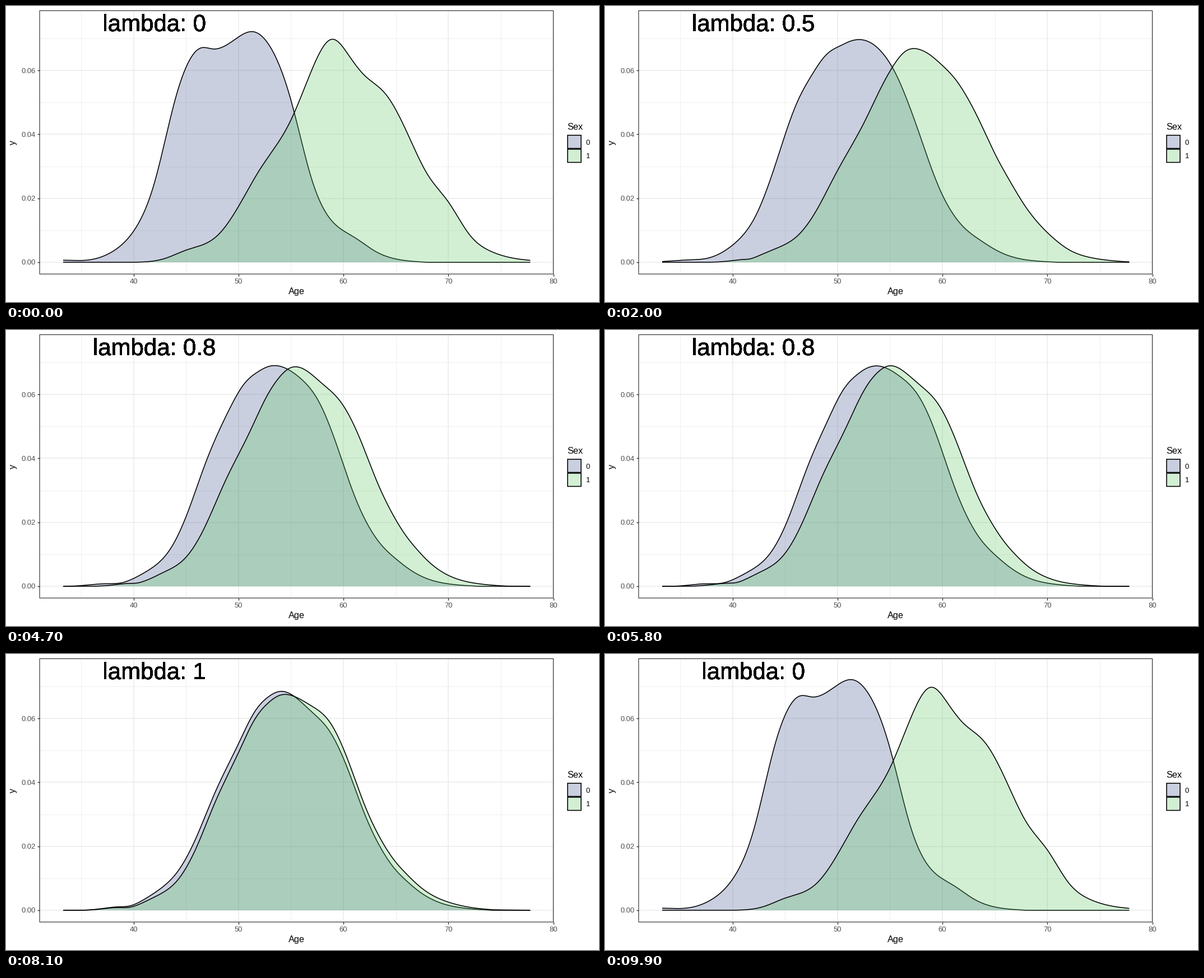
Recreate the animation shown at these times as a matplotlib script. Size 1058 px wide and 529 px high, loop 10 s.

```python
import matplotlib.pyplot as plt
import numpy as np
from matplotlib import patheffects
from matplotlib.animation import FuncAnimation
from matplotlib.patches import Polygon, Rectangle

WIDTH, HEIGHT, DPI = 1058, 529, 64
PT = 72 / DPI  # points per pixel
LEFT, RIGHT, TOP, BOTTOM = 60, 976.5, 8.4, 479
GRID, BORDER, TICK_TEXT = "#ebebeb", "#333333", "#4d4d4d"
FILLS = ("#3b528b", "#5dc863")
ALPHA = 0.275

FINE = np.linspace(30, 81, 2500)
AGES = np.linspace(33.3, 77.8, 512)
LAMBDAS = (0, 0.5, 0.8, 1)

# (age, density in thousandths) where the unrepaired curves bend
KEYS = (
    [(30.5, 0), (33.3, 0.65), (35.5, 0.65), (38, 3.35), (40, 9.7), (42, 24.9),
     (44, 51.2), (46.4, 66.9), (47.6, 66.6), (49.5, 69.2), (51.4, 72), (53, 67.4),
     (55, 50.6), (57, 25.7), (58.8, 13.3), (61, 7.9), (63, 3.5), (66, 0.5), (68, 0)],
    [(40, 0), (43, 1.2), (45, 3.8), (48, 8.4), (50, 17.5), (52, 28.9), (55, 44.6),
     (57, 60.4), (58.9, 69.9), (60.5, 64.9), (62, 58.6), (64, 52.8), (66, 41.1),
     (68, 27.6), (70, 18.9), (72, 8.7), (74, 3.5), (77.8, 0.6), (80.5, 0)],
)


def age_x(age):
    return 227.5 + (age - 40) * 18.727


def density_y(density):
    return 458 - density * 5715


def spline(x, points):
    """Natural cubic spline through the points, zero outside them."""
    px, py = np.array(points, float).T
    h, n = np.diff(px), len(px)
    system, rhs = np.eye(n), np.zeros(n)
    for i in range(1, n - 1):
        system[i, i - 1:i + 2] = h[i - 1], 2 * (h[i - 1] + h[i]), h[i]
    rhs[1:-1] = 6 * np.diff(np.diff(py) / h)
    bend = np.linalg.solve(system, rhs)
    i = np.clip(np.searchsorted(px, x) - 1, 0, n - 2)
    b = (x - px[i]) / h[i]
    a = 1 - b
    y = (a * py[i] + b * py[i + 1]
         + ((a ** 3 - a) * bend[i] + (b ** 3 - b) * bend[i + 1]) * h[i] ** 2 / 6)
    return np.where((x < px[0]) | (x > px[-1]), 0, y)


def normalised(points):
    density = np.maximum(spline(FINE, points) / 1000, 1e-8)
    return density / (density.sum() * (FINE[1] - FINE[0]))


RAW = [normalised(points) for points in KEYS]
CDFS = [np.cumsum(density) / density.sum() for density in RAW]
LEVELS = np.unique(np.concatenate(CDFS))
QUANTILES = [np.interp(LEVELS, cdf, FINE) for cdf in CDFS]
AT_QUANTILES = [np.interp(q, FINE, density) for q, density in zip(QUANTILES, RAW)]


def repaired(group, lam):
    """Density after moving each quantile by lam towards the mean of both groups."""
    other = 1 - group
    share = lam / 2
    ages = (1 - share) * QUANTILES[group] + share * QUANTILES[other]
    density = 1 / ((1 - share) / AT_QUANTILES[group] + share / AT_QUANTILES[other])
    return np.interp(AGES, ages, density)


STATES = [[repaired(group, lam) for group in (0, 1)] for lam in LAMBDAS]
# last still frame of each state, first still frame of the next
MOVES = [(5, 25), (31, 50), (55, 74), (80, 99)]

fig = plt.figure(figsize=(WIDTH / DPI, HEIGHT / DPI), dpi=DPI, facecolor="white")
ax = fig.add_axes([0, 0, 1, 1])
ax.set(xlim=(0, WIDTH), ylim=(HEIGHT, 0))
ax.axis("off")


def segment(x0, y0, x1, y1, color, width, zorder):
    ax.plot([x0, x1], [y0, y1], color=color, lw=width * PT, zorder=zorder,
            solid_capstyle="butt")


def label(x, y, text, size, color="black", ha="center", va="center_baseline", **kw):
    return ax.text(x, y, text, fontsize=size * PT, color=color, ha=ha, va=va,
                   family="Liberation Sans", zorder=8, **kw)


def box(x, y, w, h, edge, width, zorder):
    ax.add_patch(Rectangle((x, y), w, h, facecolor="none", edgecolor=edge,
                           lw=width * PT, zorder=zorder, snap=False))


# panel
for age in range(35, 80, 10):
    segment(age_x(age), TOP, age_x(age), BOTTOM, GRID, 0.8, 1)
for density in np.arange(0.01, 0.08, 0.02):
    segment(LEFT, density_y(density), RIGHT, density_y(density), GRID, 0.8, 1)
for age in range(40, 81, 10):
    x = age_x(age)
    segment(x, TOP, x, BOTTOM, GRID, 1.57, 2)
    segment(x, BOTTOM, x, BOTTOM + 4, BORDER, 1.4, 2)
    label(x, 491.5, str(age), 13, TICK_TEXT)
for density in np.arange(0, 0.07, 0.02):
    y = density_y(density)
    segment(LEFT, y, RIGHT, y, GRID, 1.57, 2)
    segment(LEFT - 4, y, LEFT, y, BORDER, 1.4, 2)
    label(53, y, f"{density:.2f}", 13, TICK_TEXT, ha="right")
box(LEFT, TOP, RIGHT - LEFT, BOTTOM - TOP, BORDER, 1.2, 7)
label(518, 515, "Age", 16.2, va="baseline")
label(12, 244, "y", 16.2, va="center", rotation=90)

# legend
label(1001, 221, "Sex", 16.2, ha="left", va="baseline")
for name, top, color in zip("01", (231, 256), FILLS):
    ax.add_patch(Rectangle((1002, top), 24, 23.5, facecolor=color, alpha=ALPHA, lw=0))
    box(1002, top, 24, 23.5, "black", 1.6, 3)
    label(1034.5, top + 12, name, 13, ha="left")

# the second density lies over the first one's outline
areas, outlines = [], []
for i, color in enumerate(FILLS):
    area = Polygon([(0, 0), (1, 1), (0, 1)], facecolor=color, alpha=ALPHA, lw=0,
                   zorder=3 + 2 * i)
    areas.append(ax.add_patch(area))
    outlines += ax.plot([], [], color="black", lw=1.57 * PT, zorder=4 + 2 * i,
                        solid_capstyle="butt")

# the title is stacked on itself, which hardens its edges
title = label(264.7, 45, "", 42, va="baseline",
              path_effects=[patheffects.Normal()] * 16)


def pose(frame):
    """Index of the state being left and the progress to the next one."""
    for i, (start, end) in enumerate(MOVES):
        if frame <= end:
            return i, max(0, (frame - start) / (end - start))
    return 0, 0


def draw(frame):
    old, t = pose(frame)
    new = (old + 1) % len(STATES)
    title.set_text(f"lambda: {LAMBDAS[new if t >= 0.5 else old]}")
    xs, base = age_x(AGES), density_y(0)
    for area, outline, a, b in zip(areas, outlines, STATES[old], STATES[new]):
        ys = density_y(a + (b - a) * t)
        outline.set_data(xs, ys)
        area.set_xy(np.column_stack([np.r_[xs[0], xs, xs[-1]], np.r_[base, ys, base]]))
    return [*areas, *outlines, title]


anim = FuncAnimation(fig, draw, frames=100, interval=100, repeat=True,
                     repeat_delay=0, blit=False)
plt.show()
```
